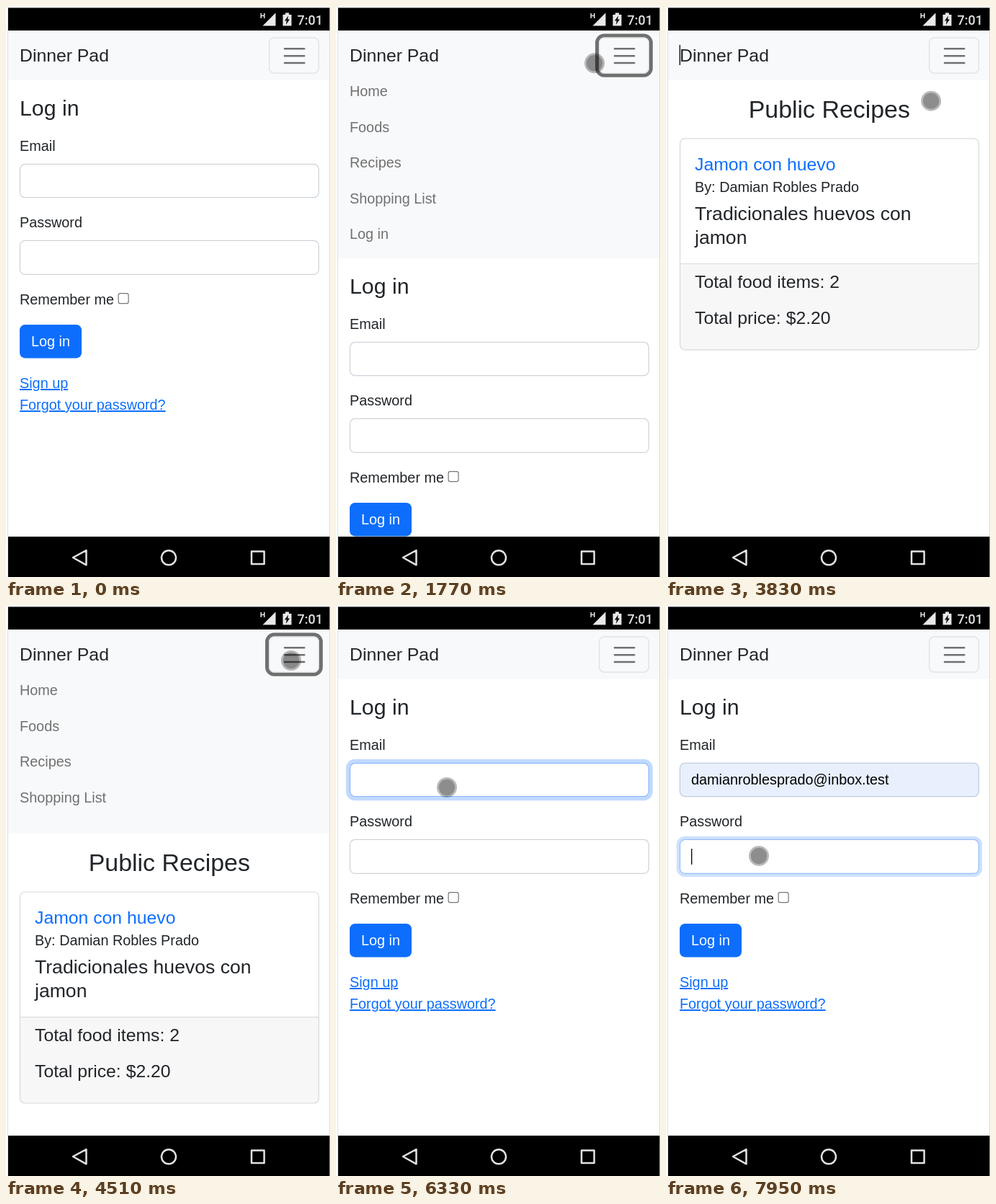
Animation, 450 px wide and 792 px high, one loop 8000 ms. Source, as an HTML page:

```html
<!DOCTYPE html>
<html lang="en">
<head>
<meta charset="utf-8">
<title>Phone login</title>
<style>
  html, body { margin: 0; width: 100%; height: 100%; overflow: hidden; background: #fff; }
  svg { display: block; width: 100vw; height: 100vh; font: 19.82px "Liberation Sans", Arial, sans-serif; }
  text { fill: #212529; white-space: pre; }
  .s25 { font-size: 24.78px; }
  .s27 { font-size: 26.6px; }
  .h2 { font-size: 30.3px; }
  .h1 { font-size: 33.9px; text-anchor: middle; }
  .link { fill: #0d6efd; }
  .under { text-decoration: underline; }
  .field { fill: #fff; stroke: #ced4da; stroke-width: 1.24; }
  .ring { fill: none; stroke: #0d6efd; }
  .icon { fill: none; stroke: #e2e2e2; stroke-width: 2.5; stroke-linejoin: round; }
</style>
</head>
<body>
<svg viewBox="0 0 450 792">
  <defs><clipPath id="fold"><rect id="foldBox" x="3" y="93" width="446" height="0"/></clipPath></defs>
  <rect width="450" height="792" fill="#fff"/>

  <g id="content">
    <g id="login">
      <text class="h2" x="19" y="152">Log in</text>
      <text x="19" y="201">Email</text>
      <text x="19" y="307">Password</text>
      <rect id="emailRing" class="ring"/>
      <rect id="email" class="field" x="19.4" y="219.4" width="415" height="46.2" rx="7"/>
      <text id="address" x="35" y="249" style="fill:#000">damianroblesprado@inbox.test</text>
      <rect id="passRing" class="ring"/>
      <rect id="pass" class="field" x="19.4" y="325.4" width="415" height="47" rx="7"/>
      <text x="19" y="414">Remember me</text>
      <rect x="156.1" y="398.7" width="14" height="14" rx="2.6" fill="#fff" stroke="#767676" stroke-width="1.2"/>
      <rect x="19" y="442" width="86" height="46.5" rx="7.4" fill="#0d6efd"/>
      <text x="35" y="472" style="fill:#fff">Log in</text>
      <text class="link under" x="19" y="530">Sign up</text>
      <text class="link under" x="19" y="560">Forgot your password?</text>
    </g>
    <g id="recipes">
      <text class="h1" x="226.8" y="155">Public Recipes</text>
      <path d="M19.5 357.5H434.5V469.5a7 7 0 0 1-7 7H26.5a7 7 0 0 1-7-7z" fill="#f7f7f7"/>
      <path d="M19.5 357.5H434.5" stroke="#dbdbdb" stroke-width="1.2"/>
      <rect x="19.5" y="183.9" width="415" height="293" rx="7" fill="none" stroke="#d9d9d9" stroke-width="1.2"/>
      <text class="s25 link" x="40" y="228">Jamon con huevo</text>
      <text x="40" y="258">By: Damian Robles Prado</text>
      <text class="s27" x="40" y="297">Tradicionales huevos con</text>
      <text class="s27" x="40" y="329.5">jamon</text>
      <text class="s25" x="40" y="391">Total food items: 2</text>
      <text class="s25" x="40" y="441">Total price: $2.20</text>
    </g>
  </g>

  <rect id="nav" x="3" y="34" width="446" height="69" fill="#f8f9fa"/>
  <text class="s25" x="19" y="77">Dinner Pad</text>
  <g id="menu" clip-path="url(#fold)"></g>
  <rect id="toggleRing" class="ring" style="stroke:#000"/>
  <rect x="365.6" y="44.1" width="68.8" height="49" rx="7" fill="none" stroke="#dfe0e1" stroke-width="1.24"/>
  <path d="M387 59.3h27.3m-27.3 9.9h27.3m-27.3 9.9h27.3" stroke="#000" stroke-opacity=".55" stroke-width="2.5" stroke-linecap="round"/>
  <rect id="caret" width="1.3" fill="#000"/>

  <g id="touch" fill="#000">
    <circle r="14" fill-opacity=".27"/>
    <circle r="11.2" fill-opacity=".24"/>
  </g>

  <path d="M2.5 3V792M449.5 34V736" stroke="#dcdee0"/>
  <rect width="450" height="2.5" fill="#f3f4f4"/>
  <rect x="3" y="2.5" width="446.5" height="31.5"/>
  <rect x="3" y="736" width="446.5" height="56"/>
  <g fill="#e8e8e8">
    <path d="M356.5 27.5H374.5V9.5z"/>
    <path d="M354.2 10v7m4.6-7v7m-4.6-3.5h4.6" stroke="#e8e8e8" stroke-width="1.5"/>
    <path d="M384.5 12h3.5V9.5h5V12h3.5V27.5h-12z"/>
    <path d="M392 13.5l-5 7h2.8l-1 5.5 5.2-7.5h-2.8z" fill="#000"/>
  </g>
  <text x="404.5" y="25.5" style="font:500 18px Roboto,sans-serif;fill:#e4e4e4">7:01</text>
  <path class="icon" d="M93 765L111.5 755V775.3z"/>
  <circle class="icon" cx="226" cy="765.3" r="10"/>
  <rect class="icon" x="341" y="756.5" width="17.6" height="17.6"/>
</svg>
<script>
const LOOP = 8000, OPEN_HEIGHT = 247;
const TO_RECIPES = 2640, TO_LOGIN = 5620, FILL = 6950, TO_PASS = 7845;
const $ = id => document.getElementById(id);
const set = (id, attrs) => { for (const k in attrs) $(id).setAttribute(k, attrs[k]); };
const show = (id, on) => set(id, { visibility: on ? 'visible' : 'hidden' });
const clamp = v => Math.min(1, Math.max(0, v));

// CSS timing function, solved by bisection
function bezier(x1, y1, x2, y2) {
  const at = (a, b, u) => 3 * a * u * (1 - u) ** 2 + 3 * b * u * u * (1 - u) + u ** 3;
  return p => {
    p = clamp(p);
    let lo = 0, hi = 1;
    for (let i = 0; i < 20; i++) {
      const mid = (lo + hi) / 2;
      if (at(x1, x2, mid) < p) lo = mid; else hi = mid;
    }
    return p === 0 || p === 1 ? p : at(y1, y2, lo);
  };
}
const ease = bezier(.25, .1, .25, 1);
const easeInOut = bezier(.42, 0, .58, 1);
const fade = (t, start, ms = 150) => easeInOut((t - start) / ms);

// time, x, y of the touch pointer
const path = [
  [780, 463, 44], [1050, 393, 74], [1740, 393, 74], [2050, 54, 127],
  [2900, 54, 127], [3080, 130, 350], [3150, 130, 350], [3220, 188, 486],
  [3550, 188, 486], [3690, 258, 345], [3830, 368, 132], [3990, 396, 77],
  [4700, 396, 77], [4980, 46, 318], [5900, 46, 318], [6080, 130, 330],
  [6320, 154, 253], [6450, 154, 253], [6650, 140, 338], [7100, 140, 338],
  [7600, 150, 320], [7660, 150, 320], [7850, 129, 348], [LOOP, 129, 348]
];
function pointer(t) {
  const i = path.findIndex(p => p[0] > t);
  if (i < 1) return path[0].slice(1);
  const [t0, x0, y0] = path[i - 1], [t1, x1, y1] = path[i];
  const k = (t - t0) / (t1 - t0);
  return [x0 + (x1 - x0) * k, y0 + (y1 - y0) * k];
}

const items = ['Home', 'Foods', 'Recipes', 'Shopping List', 'Log in'].map((label, i) => {
  const el = document.createElementNS('http://www.w3.org/2000/svg', 'text');
  el.textContent = label;
  el.setAttribute('x', 19);
  el.setAttribute('y', 125 + i * 49.55);
  $('menu').append(el);
  return el;
});

function ring(id, x, y, w, h, f, alpha) {
  const s = 4.95 * f;
  set(id, {
    x: x - s / 2, y: y - s / 2, width: w + s, height: h + s, rx: 7.4 + s / 2,
    'stroke-width': s, 'stroke-opacity': alpha * f
  });
}

function tint(id, f) {
  const mix = (a, b) => Math.round(a + (b - a) * f);
  $(id).style.stroke = `rgb(${mix(206, 134)},${mix(212, 183)},${mix(218, 254)})`;
}

function placeCaret(t, recipes) {
  if (recipes) {
    set('caret', { x: 18.6, y: 54, height: 28 });
    show('caret', t < 3150 || (t >= 3600 && t < 4100));
  } else if (t < FILL) {
    set('caret', { x: 35, y: 231, height: 23 });
    show('caret', t >= TO_LOGIN && (t < 6100 || t >= 6600));
  } else {
    set('caret', { x: 35, y: 338, height: 22 });
    show('caret', t >= TO_PASS);
  }
}

function draw(t) {
  const recipes = t >= TO_RECIPES && t < TO_LOGIN;
  const open = t < TO_RECIPES ? ease((t - 1358) / 350) : recipes ? ease((t - 4310) / 350) : 0;
  const drop = open * OPEN_HEIGHT;
  show('login', !recipes);
  show('recipes', recipes);
  set('content', { transform: `translate(0 ${drop})` });
  set('nav', { height: 69 + drop });
  set('foldBox', { height: drop });

  ring('toggleRing', 365, 43.5, 70, 50.2,
    fade(t, 1356) - fade(t, 2330) + fade(t, 4300) - fade(t, 5060), .55);
  const email = fade(t, 1250, 90) - fade(t, 1340, 140) + fade(t, TO_LOGIN) - fade(t, TO_PASS);
  const pass = fade(t, TO_PASS);
  ring('emailRing', 18.8, 218.8, 416.2, 47.4, email, .25);
  ring('passRing', 18.8, 324.8, 416.2, 48.2, pass, .25);
  tint('email', email);
  tint('pass', pass);
  $('email').style.fill = t >= FILL ? '#e8f0fe' : '#fff';
  show('address', t >= FILL);
  placeCaret(t, recipes);

  const [x, y] = pointer(t);
  show('touch', t >= 780);
  set('touch', { transform: `translate(${x} ${y})` });
  items.forEach((el, i) => {
    const hover = x < 150 && Math.abs(y - 118 - i * 49.55) < 24;
    el.style.fill = `rgba(0,0,0,${hover ? .7 : .55})`;
  });
}

const begin = performance.now();
function tick() {
  draw((performance.now() - begin) % LOOP);
  requestAnimationFrame(tick);
}
tick();
</script>
</body>
</html>
```
